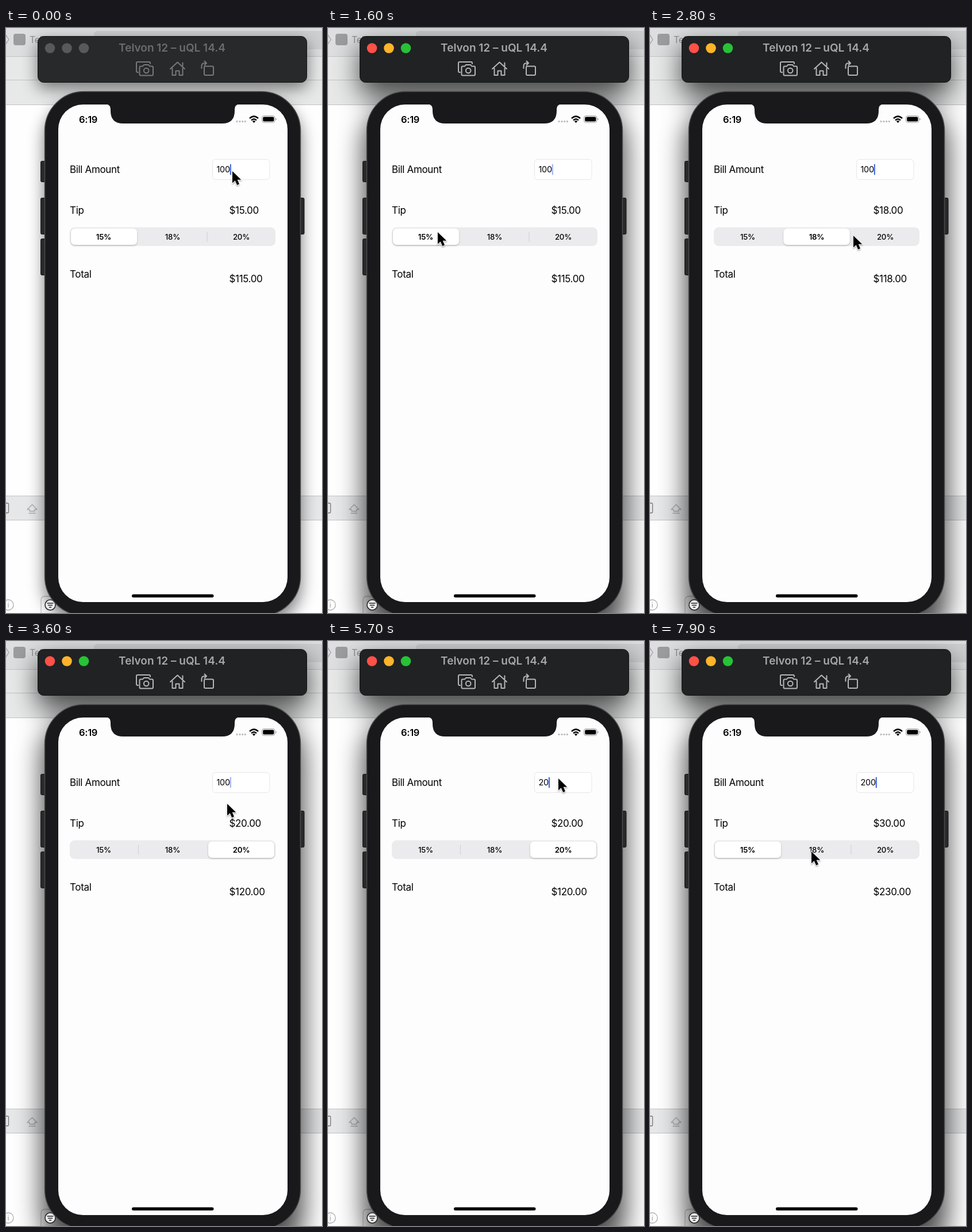
These frames come from a looping animation (550x1017 px, 8 s). An HTML page:

```html
<!DOCTYPE html>
<html lang="en">
<head>
<meta charset="utf-8">
<title>Tip calculator</title>
<style>
html, body { margin: 0; width: 100%; height: 100%; overflow: hidden; background: #fff; }
svg { display: block; width: 100vw; height: 100vh; }
text { font-family: Inter, Roboto, sans-serif; letter-spacing: -.02em; }
.body { font-size: 17px; }
.seg { font-size: 13.3px; font-weight: 500; text-anchor: middle; letter-spacing: 0; }
.line { fill: none; stroke-width: 2; stroke-linejoin: round; stroke-linecap: round; }
.shade { fill: #000; }
</style>
</head>
<body>
<svg viewBox="0 0 550 1017">
  <defs>
    <filter id="soft" x="-30%" y="-50%" width="160%" height="200%"><feGaussianBlur stdDeviation="14"/></filter>
    <filter id="deep" x="-30%" y="-80%" width="160%" height="260%"><feGaussianBlur stdDeviation="23"/></filter>
    <filter id="lift" x="-20%" y="-30%" width="140%" height="180%"><feDropShadow dx="0" dy="1.5" stdDeviation="1.6" flood-opacity=".22"/></filter>
    <filter id="drop" x="-40%" y="-30%" width="200%" height="180%"><feDropShadow dx="0" dy="1.5" stdDeviation="1.3" flood-opacity=".4"/></filter>
  </defs>

  <!-- editor window behind -->
  <rect width="550" height="1017" fill="#fefefe"/>
  <rect width="550" height="49" fill="#dcdedf"/>
  <rect y="49" width="550" height="84" fill="#e7e9e9"/>
  <rect y="813" width="550" height="43" fill="#e5e7e8"/>
  <path d="M0 49.5H550M0 90.5H550M0 133.5H550M0 813.5H550M0 855.5H550" stroke="#c0c2c3"/>
  <rect x="153" y="5" width="420" height="32" rx="6" fill="#cdcfd0"/>
  <path d="M-1 11 5 20-1 29" class="line" stroke="#a2a4a5" style="stroke-width:1.3"/>
  <rect x="13" y="10" width="21" height="20" rx="4" fill="#9b9d9e"/>
  <text x="41" y="26" font-size="16" fill="#8f9192">Telvon</text>
  <g class="line" stroke="#a9abac" style="stroke-width:1.3">
    <rect x="-6" y="826" width="10.500" height="17" rx="2" stroke="#777"/>
    <path d="M37 837 45.500 828.500 54 837H50V840H41V837ZM40 843.500H51"/>
    <circle cx="4" cy="1003" r="9"/>
    <path d="M4 1001V1007M4 998V998.300"/>
    <rect x="61" y="988" width="60" height="34" rx="6" fill="#fff" stroke="#c8c8c8"/>
  </g>

  <!-- window shadows -->
  <g id="idle" class="shade" filter="url(#soft)" opacity=".5">
    <rect x="66" y="126" width="448" height="910" rx="68"/>
    <rect x="55" y="24" width="469" height="81" rx="10"/>
  </g>
  <g id="active" class="shade" filter="url(#deep)" opacity=".7">
    <rect x="62" y="134" width="456" height="930" rx="68"/>
    <rect x="55" y="32" width="469" height="84" rx="10"/>
  </g>
  <g class="line" stroke="#222" style="stroke-width:1.5">
    <circle cx="77" cy="1003" r="9" fill="#eee"/>
    <path d="M72 1000H82M73.500 1003.500H80.500M75.500 1007H78.500"/>
  </g>

  <!-- phone -->
  <g fill="#29292c" stroke="#151517">
    <rect x="60.500" y="231.500" width="12" height="36" rx="2"/>
    <rect x="60.500" y="295.500" width="12" height="63" rx="2"/>
    <rect x="60.500" y="366.500" width="12" height="63" rx="2"/>
    <rect x="506" y="295.500" width="13" height="63" rx="2"/>
  </g>
  <rect x="67.500" y="110.500" width="445" height="911" rx="68" fill="#19181b" stroke="#4b4b4d" stroke-width="1.500"/>
  <rect x="91" y="133" width="399" height="865" rx="43" fill="#fefdfe"/>
  <path d="M174 132.500Q182 133 182 141V144Q182 166 204 166H376Q398 166 398 144V141Q398 133 406 132.500Z" fill="#19181b"/>
  <text x="127" y="164.500" font-size="16.500" font-weight="600">6:19</text>
  <path d="M402 162.500h.01M407 162.500h.01M411.700 162.500h.01M416.300 162.500h.01" class="line" stroke="#bdbdbf" style="stroke-width:3.300"/>
  <path d="M424 157.200Q431.500 150 439 157.200M427 160.400Q431.500 156.200 436 160.400" class="line" stroke="#000" style="stroke-width:2.500;stroke-linecap:butt"/>
  <path d="M428.700 162.100Q431.500 159.800 434.300 162.100L431.500 165Z"/>
  <rect x="445.500" y="152.700" width="22.500" height="11.600" rx="3.500" fill="none" stroke="#999"/>
  <rect x="447.200" y="154.400" width="19.200" height="8.200" rx="2"/>
  <path d="M469.500 156.500Q472 158.500 469.500 160.500Z" fill="#888"/>
  <rect x="219" y="984.500" width="142.500" height="5.500" rx="2.750"/>

  <!-- calculator -->
  <g class="body">
    <text x="111" y="252">Bill Amount</text>
    <text x="111" y="323">Tip</text>
    <text x="111" y="433.500">Total</text>
    <text id="tip" x="388.500" y="323"></text>
    <text id="total" x="388.500" y="442"></text>
  </g>
  <rect x="359.500" y="228.500" width="99.500" height="35" rx="5" fill="#fff" stroke="#e6e5e8"/>
  <text id="bill" x="366.500" y="251.200" font-size="14.500"></text>
  <rect id="caret" y="236.500" width="2" height="19" rx="1" fill="#3660e0"/>
  <rect x="111" y="346.500" width="358" height="32.500" rx="8.500" fill="#ebeaec"/>
  <path id="div0" d="M230.500 354V371.500" stroke="#d0cfd3"/>
  <path id="div1" d="M350 354V371.500" stroke="#d0cfd3"/>
  <rect id="knob" x="113" y="348.500" width="115" height="28.500" rx="7" fill="#fff" filter="url(#lift)"/>
  <g class="seg">
    <text x="170" y="367.700">15%</text>
    <text x="290" y="367.700">18%</text>
    <text x="409.500" y="367.700">20%</text>
  </g>

  <!-- simulator toolbar -->
  <rect id="bar" x="55.500" y="14.500" width="468" height="80" rx="10" stroke="#111"/>
  <g id="lights">
    <circle cx="76.500" cy="35" r="8.800"/>
    <circle cx="106" cy="35" r="8.800"/>
    <circle cx="135.500" cy="35" r="8.800"/>
  </g>
  <text id="title" x="289" y="41.300" font-size="19" font-weight="600" text-anchor="middle" style="letter-spacing:0">Telvon 12 – uQL 14.4</text>
  <g id="icons" class="line">
    <path d="M230 77H229Q227 77 227 75V61Q227 59 229 59H249Q251 59 251 61V62"/>
    <path d="M234.500 66.500H238L240 64H248L250 66.500H254Q256 66.500 256 68.500V80.500Q256 82.500 254 82.500H234.500Q232.500 82.500 232.500 80.500V68.500Q232.500 66.500 234.500 66.500Z"/>
    <circle cx="244.200" cy="74" r="4.300"/>
    <path d="M286 71 298.500 59.500 311 71M289.500 70V82H295.500V74.500H301.500V82H307.500V70M307.500 66V60.500"/>
    <rect x="345" y="66.500" width="16" height="15.500" rx="2"/>
    <path d="M340.500 70V66Q340.500 61 346 61H348.500M345.500 57.500 349 61 345.500 64.500"/>
  </g>

  <path id="pointer" d="M0 0V20.500L4.800 16.200 8.200 24 12 22.300 8.700 14.700H15.200Z" stroke="#fff" stroke-width="1.500" paint-order="stroke" filter="url(#drop)"/>
</svg>
<script>
const $ = id => document.getElementById(id);
const LOOP = 8000, STEP = 100;

// Rows are [time, value, ...]
const pointerKeys = [
  [0, 394, 249], [200, 394, 249], [400, 395, 250], [500, 395, 250], [700, 402, 256],
  [1000, 310, 315], [1300, 195, 360], [1400, 191, 358], [1600, 191, 355],
  [2000, 283, 362], [2400, 287, 362], [2800, 354, 361], [3000, 394, 360],
  [3200, 397, 357], [3400, 392, 333], [3600, 385, 283], [3800, 398, 243],
  [4000, 401, 239], [6100, 401, 239], [6400, 360, 267], [6800, 205, 345],
  [7000, 178, 358], [7400, 177, 358], [7600, 210, 361], [7900, 281, 366]
];
const knobKeys = [[0, 0], [2100, 0], [2400, 1], [3000, 1], [3300, 2], [7300, 2], [7600, 0]];
const amounts = [[0, 15, 115], [2200, 18, 118], [3200, 20, 120], [7500, 30, 230]];
const typed = [[0, "100"], [4600, "10"], [4700, "1"], [5100, ""], [5500, "2"], [5700, "20"], [5800, "200"]];

const current = (rows, t) => rows.findLast(row => row[0] <= t);

function tween(keys, t) {
  const a = current(keys, t), b = keys[keys.indexOf(a) + 1] || a;
  const u = a === b ? 0 : (t - a[0]) / (b[0] - a[0]);
  const e = u * u * (3 - 2 * u);
  return a.slice(1).map((v, i) => v + (b[i + 1] - v) * e);
}

function caretOpacity(t) {
  if (t >= 4600 && t < 6200) return 1;
  const p = t % 1000;
  return Math.min(1, Math.max(0, Math.abs(p - 450) / 100 - 1));
}

function draw(t) {
  const on = t >= 1500;
  $("idle").style.display = on ? "none" : "";
  $("active").style.display = on ? "" : "none";
  $("bar").setAttribute("fill", on ? "#202224" : "#28292b");
  $("title").setAttribute("fill", on ? "#a6a7a8" : "#6b6c6e");
  $("icons").setAttribute("stroke", on ? "#b5b6b7" : "#77787a");
  const colors = on ? ["#ff5148", "#ffb429", "#27c236"] : ["#58595b", "#58595b", "#58595b"];
  [...$("lights").children].forEach((dot, i) => dot.setAttribute("fill", colors[i]));

  const [, tip, total] = current(amounts, t);
  $("tip").textContent = `$${tip}.00`;
  $("total").textContent = `$${total}.00`;

  const bill = $("bill"), digits = current(typed, t)[1];
  bill.textContent = digits;
  $("caret").setAttribute("x", 366.5 + (digits ? bill.getComputedTextLength() : 0));
  $("caret").setAttribute("opacity", caretOpacity(t));

  const [slot] = tween(knobKeys, t);
  $("knob").setAttribute("transform", `translate(${slot * 119.5})`);
  $("div0").setAttribute("opacity", Math.max(0, slot - 1));
  $("div1").setAttribute("opacity", Math.max(0, 1 - slot));
  document.querySelectorAll(".seg text").forEach((label, i) => {
    label.style.fontWeight = Math.round(slot) === i ? 600 : 500;
  });

  $("pointer").setAttribute("transform", `translate(${tween(pointerKeys, t)})`);
}

const start = performance.now();
let last = -1;
function tick() {
  const t = Math.floor((performance.now() - start) % LOOP / STEP) * STEP;
  if (t !== last) draw(last = t);
  requestAnimationFrame(tick);
}
tick();
</script>
</body>
</html>
```
